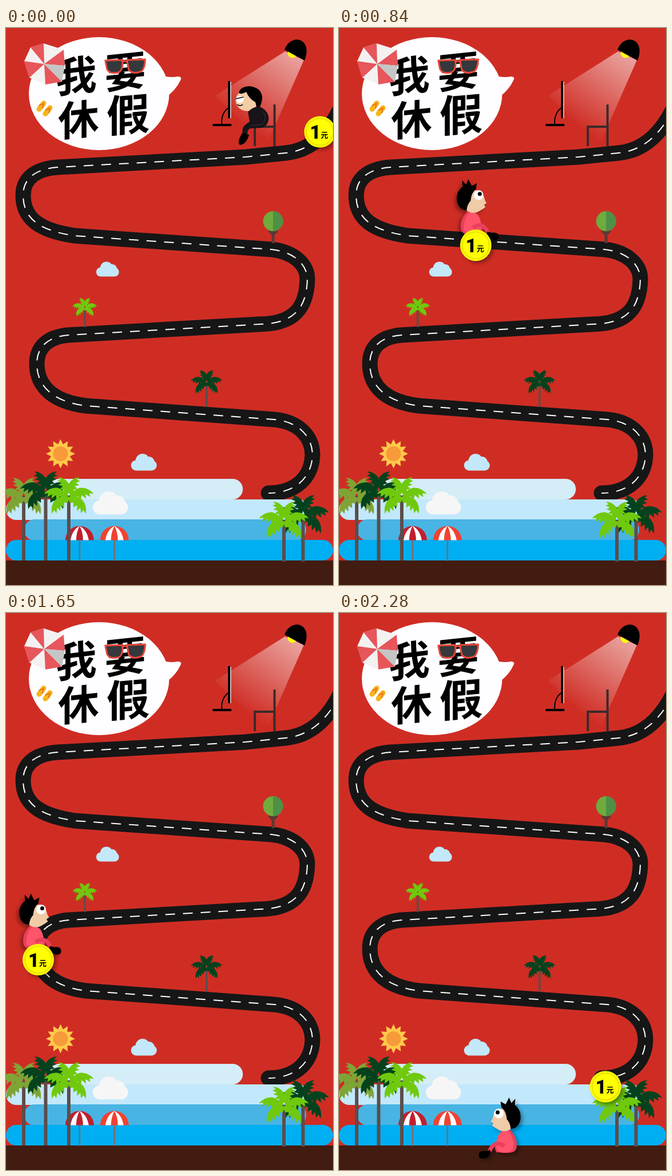
Recreate the animation shown at these times as an HTML page. Size 573x976 px, loop 2810 ms.

```html
<!DOCTYPE html>
<html lang="zh">
<head>
<meta charset="utf-8">
<style>
html, body { margin: 0; width: 100%; height: 100%; overflow: hidden; background: #cf2d24 }
svg { display: block; width: 100%; height: 100% }
text { font-family: "Noto Sans CJK SC", "Noto Sans CJK", sans-serif; font-weight: 900; text-anchor: middle }
.digit { font-family: Roboto, sans-serif }
.shadow { filter: drop-shadow(4px 4px 3px rgba(0, 0, 0, .35)) }
</style>
</head>
<body>
<svg viewBox="0 0 573 976">
<defs>
  <linearGradient id="beam" gradientUnits="userSpaceOnUse" x1="503" y1="45" x2="415" y2="170">
    <stop stop-color="#fff" stop-opacity=".56"/><stop offset="1" stop-color="#fff" stop-opacity="0"/>
  </linearGradient>
  <path id="leaf" d="M0 4Q10-9 24-8Q37-5 43 8L36 5L36 12L29 5L28 13L22 5L19 12L14 5L10 9Z"/>
  <g id="half">
    <use href="#leaf" transform="rotate(-70) scale(.85)"/>
    <use href="#leaf" transform="rotate(-14)"/>
    <use href="#leaf" transform="rotate(37)"/>
  </g>
  <g id="crown"><use href="#half"/><use href="#half" transform="scale(-1 1)"/></g>
  <g id="cloud"><rect y="10" width="40" height="16" rx="8"/><circle cx="18" cy="11" r="11"/><circle cx="28" cy="13" r="8.5"/></g>
  <g id="parasol">
    <path d="M0 0V36" stroke="#7d6a66" stroke-width="2.5"/>
    <path d="M-25 0A25 25 0 0 1 25 0Z"/>
    <path d="M-16 0Q-13-18 0-25Q-6-14-6 0ZM16 0Q13-18 0-25Q6-14 6 0Z" fill="#fff"/>
  </g>
  <g id="sandal">
    <rect x="-4.5" y="-11" width="9" height="22" rx="4.5" fill="#f7b51c"/>
    <path d="M-4 2L0-6L4 2" fill="none" stroke="#e8731c" stroke-width="2"/>
  </g>
</defs>

<!-- speech bubble -->
<g fill="#fefdff">
  <ellipse cx="163" cy="115" rx="123" ry="99"/>
  <path d="M266 82Q288 88 301 85Q309 85 306 91Q298 109 278 123Z"/>
</g>
<g font-size="72">
  <text transform="translate(123 110) skewY(-7)">我</text>
  <text transform="translate(209 103) skewY(-6)">要</text>
  <text transform="translate(127 187) skewY(-6)">休</text>
  <text transform="translate(214 180) skewY(-5)" font-size="76">假</text>
</g>
<path d="M43 34L66 27L101 38L103 66L98 94L69 99L41 87L32 58Z" fill="#f4f1f1"/>
<path d="M67 63L43 34L66 27ZM67 63L101 38L103 66ZM67 63L98 94L69 99ZM67 63L41 87L32 58Z" fill="#e6565b"/>
<path d="M67 63L103 66L98 94Z" fill="#c4c6c6"/>
<use href="#sandal" transform="translate(62 137) rotate(38)"/>
<use href="#sandal" transform="translate(73 145) rotate(38)"/>
<g fill="#35383c" stroke="#e9473a" stroke-width="3" stroke-linejoin="round">
  <path d="M174 57L204 56Q206 75 196 78Q181 81 177 72ZM212 56L244 55Q243 72 237 76Q222 82 215 73Z"/>
  <path d="M203 60Q208 56 213 60" fill="none"/>
</g>

<!-- office -->
<path d="M489 41L366 119L457 204L522 56Z" fill="url(#beam)"/>
<circle cx="502" cy="44" r="8.5" fill="#ff0"/>
<path d="M488 38C493 24 505 18 515 21C527 26 530 40 523 57Z"/>
<path d="M393.5 94V158" stroke="#fff" stroke-width="1.5"/>
<path d="M391 93V158M362 170H395" stroke="#000" stroke-width="4"/>
<path d="M391 139Q377 148 378 168" fill="none" stroke="#000" stroke-width="2"/>
<path d="M470.5 134V207M436 207V173H471" fill="none" stroke="#3a2a2a" stroke-width="4"/>

<path id="road" d="M585 143Q550 213 490 219L420 226L90 244C50 247 30 265 30 293C30 335 60 355 120 364L465 388C505 392 528 415 528 440C527 490 505 518 445 519L110 538C72 541 54 560 54 588C54 630 85 655 140 662L470 686C515 690 537 718 537 748C536 785 510 815 460 815" fill="none" stroke="#161616" stroke-width="27" stroke-linecap="round"/>
<use href="#road" id="lane"/>

<!-- roadside -->
<path d="M468 350V377M468 362L461 355M468 362L475 355" stroke="#5a3a34" stroke-width="5"/>
<circle cx="468" cy="338.5" r="17.5" fill="#6fab3d"/>
<path d="M468 321A17.5 17.5 0 0 1 468 356Z" fill="#4e9046"/>
<g fill="#c3e8fa">
  <use href="#cloud" transform="translate(158 409.5)"/>
  <use href="#cloud" transform="translate(219 746) scale(1.13)"/>
</g>
<path id="sun" fill="#ffc94a"/>
<circle cx="95.5" cy="746" r="13" fill="#f79a3a"/>

<!-- sea and beach -->
<rect x="75" y="790" width="340" height="36" rx="18" fill="#d4edf7"/>
<rect y="826" width="530" height="36" rx="18" fill="#c2e8fb"/>
<rect x="32" y="861" width="494" height="37" rx="18" fill="#48b4e3"/>
<rect y="897" width="573" height="36" rx="18" fill="#00aef2"/>
<rect y="933" width="573" height="43" fill="#421c11"/>
<use href="#cloud" fill="#f6f6f6" transform="translate(152 812) scale(1.55)"/>
<use href="#parasol" fill="#c11f2d" transform="translate(129 897.5)"/>
<use href="#parasol" fill="#f14232" transform="translate(190 897.5)"/>
<g id="palms"></g>

<g id="clerk">
  <ellipse cx="422" cy="127" rx="19.5" ry="18.5" fill="#f3cda6"/>
  <path d="M408 114Q410 102 428 102Q448 105 449 122Q448 138 440 142L437 130Q426 124 421 112Q413 117 408 114Z"/>
  <circle cx="410" cy="125" r="6.5" fill="#fff"/>
  <path d="M403 124L416 121M405 134Q410 138 415 134" fill="none" stroke="#000" stroke-width="1.5"/>
  <path d="M424 147Q433 137 445 138Q462 146 460 162Q457 174 446 175L428 176Q421 178 424 190H416Q411 176 420 169L427 164Z" fill="#17141a"/>
  <path d="M451 147Q458 160 449 169L428 171" fill="none" stroke="#3b343f"/>
  <path d="M414 184L426 187Q421 204 410 205Q404 200 414 184Z"/>
</g>

<g id="rider">
  <g class="shadow">
    <path d="M3-55Q8-62 18-59Q32-45 29-27Q26-18 12-19L-6-20Q-14-34 0-36Q-4-48 3-55Z" fill="#e83f5c"/>
    <path d="M0-54Q8-61 16-56Q25-42 24-28Q20-20 8-19Q-8-20-7-35Q-5-48 0-54Z" fill="#ff5469"/>
    <path d="M8-31Q-11-42-18-22" fill="none" stroke="#e83f5c" stroke-width="7"/>
    <path d="M-17-24Q-15-11-29-9Q-38-8-37-17Q-36-23-25-22Z"/>
    <circle cx="7" cy="-77" r="20" fill="#f0cba8"/>
    <path d="M-11-82L-16-74L-11-71L-14-67L-7-62L2-70Z" fill="#f0cba8"/>
    <path d="M3-98L1-109L10-104L16-116L20-106L27-114L26-103Q38-94 36-78Q33-62 19-61Q18-72 12-78Q11-92 3-98Z"/>
    <circle cx="-2" cy="-88" r="8.5" fill="#fff"/>
    <circle cx="-4" cy="-90" r="3.5"/>
  </g>
</g>
<g id="coin">
  <circle r="27.5" fill="#ff0" class="shadow"/>
  <circle r="23.5" fill="none" stroke="#e4dc00" stroke-width="1.5"/>
  <text class="digit" x="-8" y="12" font-size="33">1</text>
  <text x="8" y="10" font-size="13">元</text>
</g>
</svg>
<script>
const el = id => document.getElementById(id);
const mix = (a, b, p) => a + (b - a) * p;

// the lane reuses the road's course with its own stroke
const lane = el('road').cloneNode();
lane.style.cssText = 'stroke: #fff; stroke-width: 2; stroke-linecap: butt; stroke-dasharray: 17 14';
el('lane').replaceWith(lane);

const spikes = Array.from({ length: 24 }, (_, i) => {
  const r = i % 2 ? 17 : 25.5, a = i * Math.PI / 12 - Math.PI / 2;
  return [95.5 + r * Math.cos(a), 746 + r * Math.sin(a)];
});
el('sun').setAttribute('d', 'M' + spikes.join('L') + 'Z');

const palm = (x, y, scale, color, base) =>
  `<path d="M${x} ${y}V${base}" stroke="#5c4d4b" stroke-width="${scale < .8 ? 3.5 : 6}"/>
   <use href="#crown" fill="${color}" transform="translate(${x} ${y}) scale(${scale})"/>`;
const lime = '#70c90d', pine = '#04421d';
el('palms').innerHTML =
  palm(138, 489, .5, lime, 524) +
  palm(351.5, 620, .64, pine, 664) +
  palm(31, 820, 1, '#7fa436', 933) +
  palm(69.5, 810, 1.03, pine, 933) +
  palm(110, 819, 1, lime, 933) +
  palm(520.5, 852, 1.05, pine, 935) +
  palm(487, 862, 1, lime, 935);

// time, x, y where bends and straight runs of the ride meet, a bend first
const joints = [
  [0, 550, 182], [90, 477, 220], [570, 83, 274], [630, 75, 352], [1200, 522, 430],
  [1290, 490, 511], [1620, 64, 570], [1680, 105, 645], [1980, 510, 713], [2130, 467, 830]
];

function ride(t) {
  const next = joints.findIndex(j => j[0] > t), i = (next < 0 ? joints.length : next) - 1;
  const [t0, x0, y0] = joints[i], [t1, x1, y1] = joints[i + 1] || joints[i];
  const p = t1 > t0 ? (t - t0) / (t1 - t0) : 0;
  const bend = i % 2 === 0;
  const swing = bend ? (i % 4 ? -28 : 28) * Math.sin(Math.PI * p) : 0;
  const leg = Math.floor((i + 1 + (bend && p >= .5)) / 2);
  return { x: mix(x0, x1, p) + swing, y: mix(y0, y1, p), side: leg % 2 ? -1 : 1 };
}

// the rider flies off to the left, overshoots and lands on the beach
const leap = p => ({
  x: mix(467, 282, p) - 340 * p * Math.sin(Math.PI * p),
  y: mix(830, 965, p),
  side: -1
});

function draw(now) {
  const t = Math.min(2280, Math.floor(now % 2810 / 30) * 30);
  const coin = ride(Math.min(t, 2130));
  const man = t > 2130 ? leap((t - 2130) / 150) : { ...coin, x: coin.x + 3 * coin.side };
  const riding = t >= 120;
  el('coin').setAttribute('transform', `translate(${coin.x} ${coin.y})`);
  el('rider').setAttribute('transform', `translate(${man.x} ${man.y}) scale(${-man.side} 1)`);
  el('rider').style.display = riding ? '' : 'none';
  el('clerk').style.display = riding ? 'none' : '';
}

let start;
function tick(now) {
  start ??= now;
  draw(now - start);
  requestAnimationFrame(tick);
}
draw(0);
requestAnimationFrame(tick);
</script>
</body>
</html>
```
